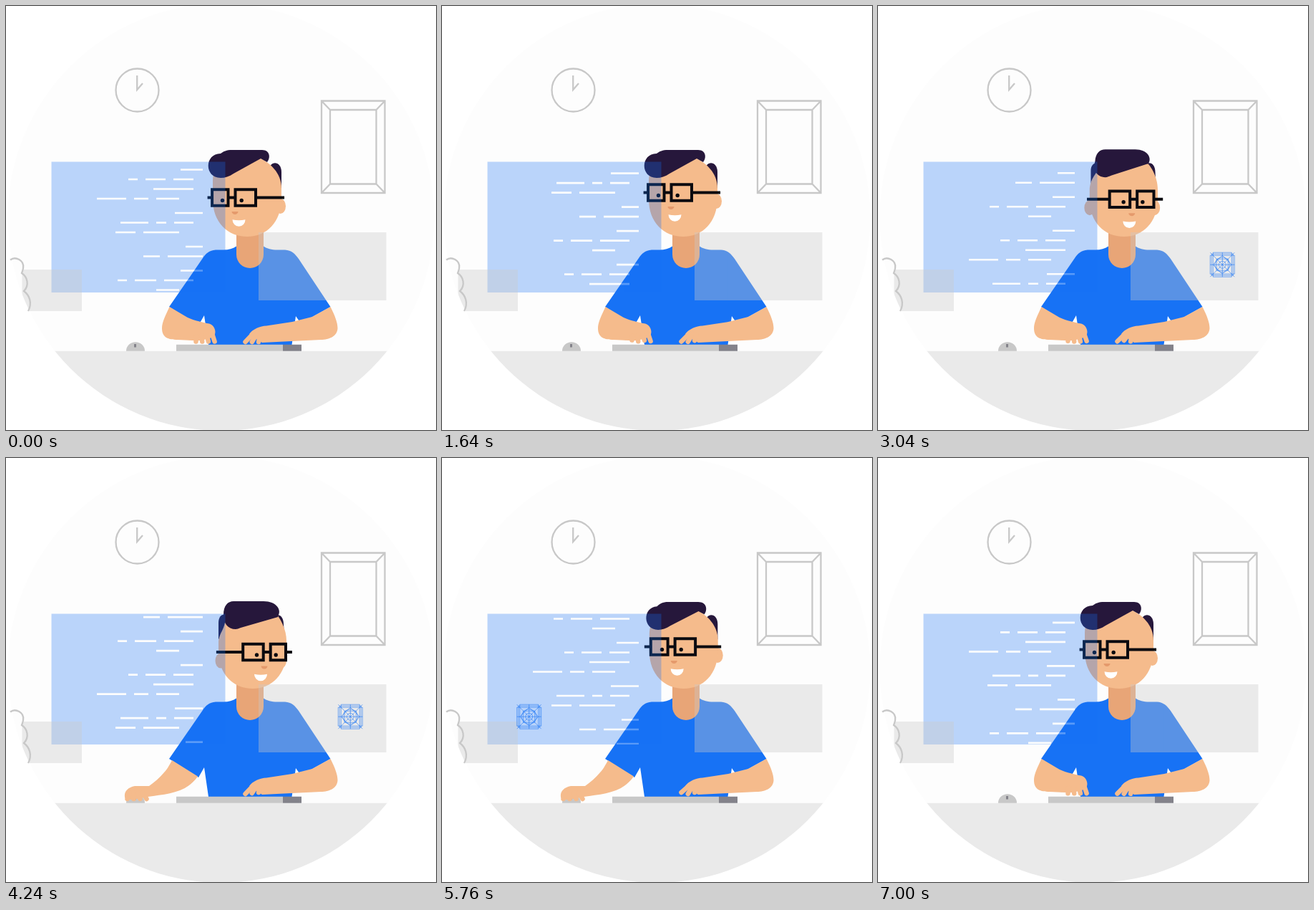
An HTML page that plays this animation: 601x592 px, repeating every 7040 ms.

```html
<!DOCTYPE html>
<html lang="en">
<head>
<meta charset="utf-8">
<title>Working at a desk</title>
<style>
  html, body { margin: 0; width: 100%; height: 100%; overflow: hidden; background: #fff; }
  svg { display: block; width: 601px; height: 592px; }
  .outline { fill: none; stroke: #c8c8c8; stroke-width: 2.3; }
  .skin { fill: #f5bb8c; }
  .hair { fill: #26173b; }
  .finger { stroke: #f5bb8c; stroke-width: 6.5; stroke-linecap: round; }
  .glasses { fill: none; stroke: #0a0a0f; stroke-width: 4; }
  .pane { fill: #c8c8c8; opacity: .37; }
</style>
</head>
<body>
<svg viewBox="0 0 601 592">
  <defs>
    <clipPath id="stage"><circle cx="300.5" cy="295" r="298"/></clipPath>
    <clipPath id="screen"><path d="M63.5 217.5H306.5V400H63.5Z"/></clipPath>
  </defs>
  <g clip-path="url(#stage)">
    <rect width="601" height="592" fill="#fdfdfd"/>
    <g class="outline">
      <circle cx="183.5" cy="117.5" r="30"/>
      <path d="M183.2 97V117L191 108"/>
      <path d="M441 132.5H529.5V261H441ZM453 145H517.5V248.5H453ZM441 132.5L453 145M529.5 132.5L517.5 145M441 261L453 248.5M529.5 261L517.5 248.5"/>
    </g>

    <path fill="#1772f5" d="M322 335.5C317 339 311 340.5 304 340.5H293C284 341 279 346 275 352L228 420L269 446L277 432L283 473H399.5L405 433L412 443L453.5 420L409 353C404 346 399 341 390 340.5H379C371 340.5 365 339 360 335.5Z"/>
    <path fill="#e8a577" d="M322 305H360V347A19 19 0 0 1 322 347Z"/>

    <path id="burnL" class="hair"/>
    <path id="burnR" class="hair"/>
    <ellipse id="earL" class="skin" rx="7.5" ry="10.5"/>
    <ellipse id="earR" class="skin" rx="7.5" ry="10.5"/>
    <path id="face" class="skin"/>
    <path id="hair" class="hair"/>
    <path id="nose" fill="#e59a6c" d="M-4.5 -1.5H4.5A4.5 4 0 0 1 -4.5 -1.5Z"/>
    <path id="mouth" fill="#fff" d="M-9 0Q0 2 9 0A9 9.5 0 0 1 -9 0Z"/>
    <g id="eyes" fill="#0a0a0f"><circle r="2.7"/><circle cx="26.7" r="2.7"/></g>
    <path id="glasses" class="glasses"/>

    <path fill="#eaeaea" d="M0 481.7H601V592H0Z"/>
    <path fill="#c8c8c8" d="M238 472.8H387V481.7H238ZM168 481.7A13 12.5 0 0 1 194 481.7Z"/>
    <path fill="#83828a" d="M387 472.8H413V481.7H387ZM179 472H182V476.5H179Z"/>

    <path class="skin" d="M453.5 420C460 433 463.5 442 463.5 450C463 461 452 466 440 466L358 470L340 458C345 451 355 447 364 446.5L400 441L428 434Z"/>
    <path id="arm" class="skin"/>
    <g id="fingers"></g>

    <g opacity=".285" clip-path="url(#screen)">
      <path fill="#1772f5" d="M63 217H307V401H63Z"/>
      <path id="code" stroke="#fff" stroke-width="2.7"/>
    </g>
    <path class="pane" d="M353 316H531.5V411H353Z"/>
    <path class="pane" d="M22.5 368H106V426H22.5Z"/>

    <g id="icon" fill="none" stroke="#1772f5" stroke-opacity=".7" stroke-width=".8">
      <path d="M-17 -13H17V13H-17ZM-13 -17H13V17H-13ZM-15 -15H15V15H-15ZM-8 -8H8V8H-8Z"/>
      <path d="M-17 -17L17 17M17 -17L-17 17M-17 0H17M0 -17V17M0 -13L13 0L0 13L-13 0Z"/>
      <circle r="10.5"/><circle r="5"/>
    </g>
  </g>
  <path class="outline" d="M6 354.5C13 349 26 355 24 366C23.7 369 22.5 371 22 373C30 378 33 390 25 398C33 404 37 415 31 426"/>
</svg>
<script>
const LOOP = 7040, STEP = 40;
const el = id => document.getElementById(id);
const lerp = (a, b, p) => a + (b - a) * p;
const move = (id, x, y) => el(id).setAttribute('transform', `translate(${x} ${y})`);
const draw = (id, d) => el(id).setAttribute('d', d);

// Eased rise from 0 to 1 between two times.
function ramp(t, from, to) {
  const p = Math.min(1, Math.max(0, (t - from) / (to - from)));
  return p * p * (3 - 2 * p);
}

// Blend of two paths that share the same commands.
function blend([a, b], p) {
  const ends = b.match(/-?[\d.]+/g);
  let i = 0;
  return a.replace(/-?[\d.]+/g, n => lerp(+n, +ends[i++], p).toFixed(2));
}

// Each part facing left, then facing right.
const headShapes = {
  face: ['M289 245C289 225 300 212 337 212L356 213C368 219 385 232 385 255L385 268C385 302 364 322 337 322C310 322 289 302 289 270Z',
         'M297 256C299 242 306 240 307 222L372 212C384 222 392 240 392 255L392 270C392 302 371 322 345 322C318 322 297 302 297 270Z'],
  hair: ['M300 240C277 240 277 206 300 206C304 203 308 201 316 201L358 201C369 201 370 212 365 218L356 213L318 234C312 238 306 240 300 240Z',
         'M321 239C310 239 304 231 304 219C304 206 310 200 318 200L360 200C378 200 386 212 380 221L380 222L328 237C325 238 323 239 321 239Z'],
  burnL: ['M300 230C300 222 310 222 310 225L320 240L300 250Z',
          'M297 230C297 215 312 215 312 228L312 245L297 253Z'],
  burnR: ['M367 232C367 215 385 215 385 232L385 255L372 240Z',
          'M372 232C372 215 388 215 388 232L388.5 240L376 240Z']
};
// Left arm on the keyboard, then on the mouse.
const armShapes = [
  'M228.5 420C222 434 218 442 218 450C218 463 227 466 240 466L262 467C270 468 280 466 290 462C295 456 292 446 284 443.5C276 442 262 439 253 434.5Z',
  'M232 422C228 430 224 436 221 439C214 447 207 453 200 458L180 458C170 460 165 466 166 473C166 480 184 476 198 473C225 469 252 468 268 444.5Z'];

function addFinger(from, to, taps, rests) {
  const line = document.createElementNS('http://www.w3.org/2000/svg', 'line');
  line.setAttribute('class', 'finger');
  el('fingers').append(line);
  return { line, from, to, taps, rests };
}
const fingers = [];
for (let i = 0; i < 4; i++)
  fingers.push(addFinger([266 + 7.4 * i, 461 - i, 265.5 + 8.7 * i, 468.5],
                         [172 + 6.4 * i, 467.5, 169.5 + 9 * i, 476], 19 + 2 * i, true));
for (let i = 0; i < 3; i++) {
  const pose = [346 + 4.5 * i, 457 + i, 334.5 + 9.3 * i, 469];
  fingers.push(addFinger(pose, pose, 25 - 3 * i, false));
}

// Blocks of code: dash lengths per row, from the right edge inwards.
const blocks = [
  [[31], [28, 28, 13], [56], [32, 20, 41]],
  [[39], [27, 14, 39], [50, 28]],
  [[24], [49, 23]],
  [[31], [41, 30, 13], [32]]
];
function layoutCode() {
  let y = 228.5, d = '';
  for (const block of [...blocks, ...blocks]) {
    block.forEach((dashes, i) => {
      const last = block.length - 1;
      let x = i === 0 || last < 2 ? 275 : i < last ? 262 : 242;
      for (const width of dashes) {
        d += `M${x} ${y}h${-width}`;
        x -= width + 11;
      }
      y += i < last ? 13.5 : 20;
    });
  }
  return d;
}
draw('code', layoutCode());

function drawHead(u, y) {
  for (const id in headShapes) draw(id, blend(headShapes[id], u));
  const swing = Math.sin(Math.PI * u);
  move('earL', 303 - 3 * u - 10 * swing, y + 12);
  move('earR', 383.5 + u + 5 * swing, y + 12);
  move('nose', 320 + 41 * u, y + 21);
  move('mouth', 325.5 + 30.5 * u, y + 30.8);
  move('eyes', 302.5 + 48 * u, y + 4);

  // The lens on the far side of the turned head is narrower.
  const bridge = 315.5 + 49.2 * u, side = bridge - 338;
  const left = 28.5 - 0.27 * Math.max(0, -side), right = 28.5 - 0.27 * Math.max(0, side);
  const x1 = bridge - 5 - left, x2 = bridge + 5;
  const lens = (x, w) => `M${x} ${y - 11.3}h${w}v22.6h${-w}Z`;
  draw('glasses', lens(x1, left) + lens(x2, right) +
    `M${287.2 + 0.25 * side} ${y}H${x1}M${bridge - 5} ${y}H${x2}M${x2 + right} ${y}H${394 + 0.22 * side}`);
}

function drawHands(t, reach) {
  draw('arm', blend(armShapes, reach));
  for (const { line, from, to, taps, rests } of fingers) {
    const lift = (1 - Math.cos(2 * Math.PI * taps * t / LOOP)) * (rests ? 1 - reach : 1);
    const [x1, y1, x2, y2] = from.map((v, k) => lerp(v, to[k], reach));
    const ends = { x1, y1, x2, y2: y2 - lift };
    for (const name in ends) line.setAttribute(name, ends[name]);
  }
}

function drawIcon(t) {
  const x = lerp(481.3, 121.7, ramp(t, 5060, 5760));
  const angle = 90 * (ramp(t, 3040, 3850) + ramp(t, 4240, 5040));
  const size = ramp(t, 2500, 2760) - ramp(t, 6250, 6500);
  el('icon').setAttribute('opacity', size);
  el('icon').setAttribute('transform', `translate(${x} 361.2) rotate(${angle}) scale(${size})`);
}

function render(t) {
  // Code scrolls faster while both hands type.
  const typed = Math.min(t, 3040) + Math.max(0, t - 6800);
  move('code', 0, -(0.0205 * t + 0.0133 * typed));

  const turn = ramp(t, 2400, 3250) - ramp(t, 5000, 5950);
  const gaze = 267.5 - 7 * ramp(t, 0, 1640) + 10.5 * ramp(t, 2300, 3250)
    - 7.5 * ramp(t, 5000, 5700) + 4 * ramp(t, 5700, 6900);
  drawHead(turn, gaze);
  drawHands(t, ramp(t, 3400, 3950) - ramp(t, 6100, 6650));
  drawIcon(t);
}

const start = performance.now();
function tick() {
  const t = (performance.now() - start) % LOOP;
  render(Math.floor(t / STEP) * STEP);
  requestAnimationFrame(tick);
}
tick();
</script>
</body>
</html>
```
